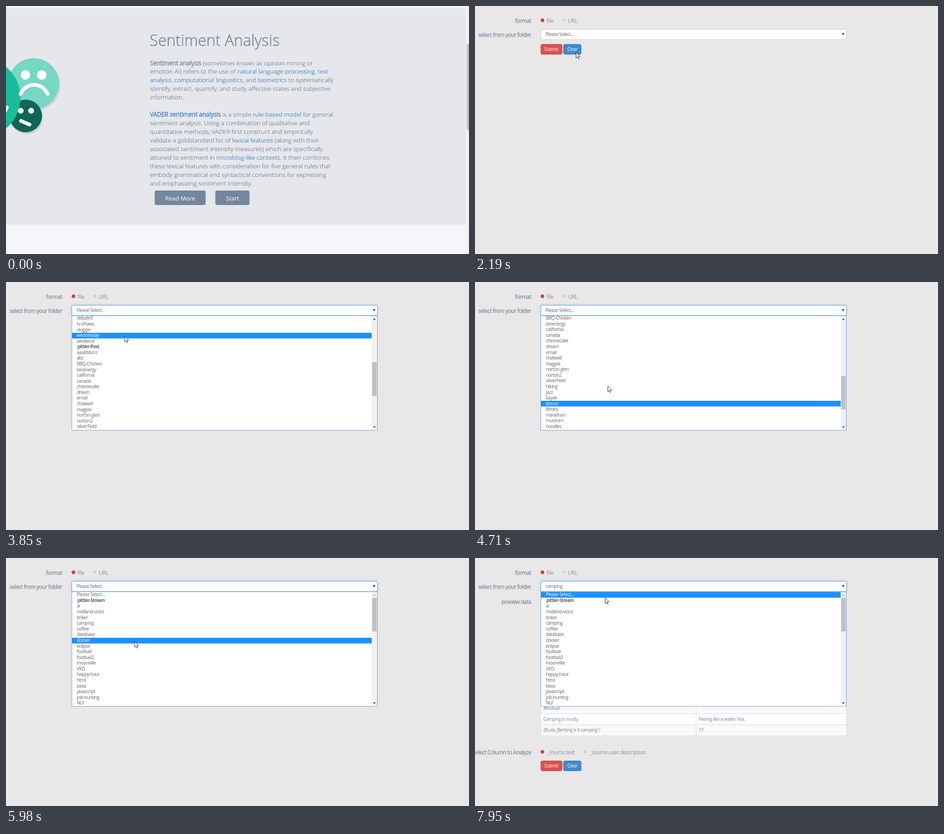
These frames come from a looping animation (1023x547 px, 8 s). An HTML page:

```html
<!DOCTYPE html>
<html lang="en">
<head>
<meta charset="utf-8">
<title>Sentiment Analysis</title>
<style>
html, body { margin: 0; width: 100%; height: 100%; overflow: hidden; background: #e9e7e7; }
svg { display: block; }
text { font-family: "Open Sans", "Noto Sans", sans-serif; white-space: pre; }
.title { font-size: 34.1px; font-weight: 300; fill: #74879f; stroke: #74879f; stroke-width: .5px; }
.body { font-size: 13.6px; font-weight: 300; fill: #6f8098; color: #6f8098; stroke: currentColor; stroke-width: .22px; }
.bold { font-weight: 400; letter-spacing: -.29px; stroke: currentColor; stroke-width: .3px; }
.link { fill: #3580c6; color: #3580c6; stroke: currentColor; }
.big { font-size: 13.1px; fill: #fff; text-anchor: middle; }
.label, .option { font-size: 12px; letter-spacing: -.48px; fill: #74879f; }
.label { text-anchor: end; stroke: #74879f; stroke-width: .25px; }
.option { fill: #8794a8; }
.small { font-size: 10px; letter-spacing: -.38px; fill: #616161; }
.small.group { font-weight: 600; letter-spacing: -.5px; fill: #3a3a3a; }
.small.white { fill: #fff; }
.cell { fill: #6f8097; }
.mid { text-anchor: middle; }
</style>
</head>
<body>
<svg width="1023" height="547" viewBox="0 0 1023 547">
  <defs>
    <clipPath id="listClip"><rect x="146" y="75" width="674" height="251.5"/></clipPath>
    <filter id="blur" x="-5%" y="-60%" width="110%" height="220%"><feGaussianBlur stdDeviation="2"/></filter>
    <g id="on"><circle r="5.2" fill="#f6f4f4"/><circle r="4.2" fill="#cb4640"/></g>
    <g id="off"><circle r="5.2" fill="#f6f4f4"/><circle r="4.2" fill="#d2d3d3"/></g>
  </defs>

  <g id="intro">
    <rect width="1023" height="547" fill="#f5f6f8"/>
    <rect y="4.5" width="1016" height="478" fill="#e6e7eb"/>
    <rect x="1016" width="7" height="547" fill="#f1f1f1"/>
    <rect x="1018" y="84" width="5" height="190" fill="#c1c1c1"/>
    <g fill="#cdcfd4"><circle cx="64" cy="174.5" r="56"/><circle cx="46" cy="246.5" r="36"/></g>
    <circle cx="61" cy="171" r="56" fill="#76d7c4"/>
    <circle cx="43.5" cy="242.5" r="36" fill="#0e6655"/>
    <circle cx="-56" cy="202" r="88" fill="#1abc9c"/>
    <g fill="#fff">
      <circle cx="43" cy="152" r="10.5"/><circle cx="79" cy="152" r="10.5"/>
      <circle cx="32.5" cy="231" r="6.5"/><circle cx="55.5" cy="231" r="6.5"/>
    </g>
    <g fill="none" stroke="#fff" stroke-width="8" stroke-linecap="round">
      <path d="M32 194Q42 174 62 174T92 194"/>
      <path d="M33 253.500L52 261.500M-6 238L2 224"/>
    </g>
    <text class="title" x="317.500" y="87.500">Sentiment Analysis</text>
    <g id="prose"></g>
    <rect x="328.500" y="407" width="112.500" height="32" rx="4" fill="#74879f"/>
    <rect id="start" x="462.500" y="407" width="75.500" height="32" rx="4"/>
    <text class="big" x="385" y="428.500">Read More</text>
    <text class="big" x="500.500" y="428.500">Start</text>
  </g>

  <g id="form">
    <text class="label" x="124" y="36.500">format</text>
    <use href="#on" x="149" y="31.500"/><text class="option" x="158" y="36.500">file</text>
    <use href="#off" x="196" y="31.500"/><text class="option" x="205" y="36.500">URL</text>
    <text class="label" x="124" y="67.500">select from your folder</text>
    <rect class="glow" x="144.500" y="50.500" width="677" height="24.500" rx="4" fill="#66afe9" filter="url(#blur)"/>
    <rect x="145.500" y="51.500" width="675" height="22.500" rx="3" fill="#fff" stroke="#ccc"/>
    <rect class="glow" x="145.500" y="51.500" width="675" height="22.500" rx="3" fill="none" stroke="#66afe9"/>
    <text id="value" class="small" x="155.800" y="66"></text>
    <path d="M811 59.800h5l-2.500 5.500z" fill="#333"/>
    <g id="address">
      <text class="label" x="124" y="101">URL</text>
      <rect x="145.500" y="84.500" width="675" height="23" rx="3" fill="#fff" stroke="#ccc"/>
      <text class="small" x="153.500" y="99.500">https://techservices.illinois.edu/news/2015/telling-compelling-stories-social-media-analytics-team</text>
    </g>
    <g id="preview">
      <text class="label" x="124" y="101">preview data</text>
      <g id="table"></g>
      <text class="label" x="124" y="433">Select Column to Analyze</text>
      <use href="#on" x="149" y="427.500"/><text class="option" x="158.500" y="433">_source.text</text>
      <use href="#off" x="243" y="427.500"/><text class="option" x="253" y="433">_source.user.description</text>
    </g>
    <g id="buttons">
      <rect x="145.500" y="84.500" width="47" height="22" rx="3" fill="#d9534f" stroke="#d43f3a"/>
      <rect x="195.500" y="84.500" width="39" height="22" rx="3" fill="#428bca" stroke="#357ebd"/>
      <text class="small white mid" x="168.500" y="99">Submit</text>
      <text class="small white mid" x="215" y="99">Clear</text>
    </g>
    <g id="menu">
      <rect x="145.500" y="74.500" width="675" height="252.500" fill="#fff" stroke="#6d9fd6"/>
      <g clip-path="url(#listClip)">
        <rect id="mark" x="146" width="662" height="12.500" fill="#1e90ff"/>
        <g id="list"></g>
      </g>
      <rect x="808" y="75" width="12" height="251.500" fill="#f1f1f1"/>
      <rect id="thumb" x="809" width="10" height="74" fill="#c1c1c1"/>
      <path id="upArrow" d="M811 83.500h6l-3-3.500z"/>
      <path d="M811 318.500h6l-3 3.500z" fill="#444"/>
    </g>
  </g>

  <path id="cursor" d="M.5.500V13L3.400 10.300L5.300 14.700L7.200 13.900L5.300 9.500H9Z" fill="#fff" stroke="#111" stroke-width=".9"/>
</svg>
<script>
const LOOP = 8000, ROW = 12.58, TOP = 75, TICK = 33.65;
const $ = id => document.getElementById(id);
const set = (el, attrs) => { for (const k in attrs) el.setAttribute(k, attrs[k]); };
const show = (id, on) => { $(id).style.display = on ? '' : 'none'; };
const add = (parent, tag, attrs, content = '') => {
  const el = document.createElementNS('http://www.w3.org/2000/svg', tag);
  set(el, attrs);
  el.innerHTML = content;
  parent.appendChild(el);
  return el;
};

// [link] and *bold* markup
const prose = `*Sentiment analysis* (sometimes known as opinion mining or
emotion AI) refers to the use of [natural language processing], [text]
[analysis], [computational linguistics], and [biometrics] to systematically
identify, extract, quantify, and study affective states and subjective
information.

[*VADER sentiment analysis*] is a simple [rule-based model] for general
sentiment analysis. Using a combination of qualitative and
quantitative methods, VADER first construct and empirically
validate a goldstandard list of [lexical features] (along with their
associated sentiment intensity measures) which are specifically
attuned to sentiment in [microblog-like contexts]. It then combines
these lexical features with consideration for five general rules that
embody grammatical and syntactical conventions for expressing
and emphasizing sentiment intensity.`;
prose.split('\n').forEach((line, i) => add($('prose'), 'text',
  { class: 'body', x: 318, y: 130.5 + i * 18.96 },
  line.replace(/\[(.*?)\]/g, '<tspan class="link">$1</tspan>')
      .replace(/\*(.*?)\*/g, '<tspan class="bold">$1</tspan>')));

const names = `Please Select...,pittler-Stream,ai,midland-voice,tinker,camping,coffee,database,docker,eclipse,
football,football2,moonville,VKD,happy-hour,html,bexa,javascript,job-hunting,NLF,program,Bill-dunby,wendlows,
tennis,debate5,tv-shows,vlogger,wednesday,weekend,pittler-Post,aaabbbccc,abc,BBQ-Chicken,bioenergy,california,
canada,cheesecake,dream,email,chatwell,magpie,norton-glen,norton2,oliverField,hiking,jazz,kayak,lemon,library,
marathon,museum,noodles,ocean,pancakes,python,recipes,robotics,sailing,sunrise,tulips,winter`.split(/,\s*/);
const isGroup = i => names[i].startsWith('pittler');
const items = names.map((name, i) => add($('list'), 'text',
  { x: isGroup(i) ? 157.8 : 156.4, y: 84.3 + i * ROW }, name));

const rows = [
  ['_source.text', '_source.user.description'],
  ['Packing the tent and the stove tonight, we leave for the lake early\ntomorrow morning and stay until Sunday.\n#camping', 'Weekend hiker, weekday gardener.'],
  ['Who else thinks that camping in the rain is still better than a day\nat the office? The fire is going and the coffee is hot.\n#outdoors', 'Coffee first.'],
  ['Our first family camping trip of the year was a great success, no\nbears and only one wet sleeping bag.\n#family', 'Mother of three, lover of maps.'],
  ['Looking for a good camping spot near the river, any ideas for a\nquiet place?', 'Always on the road.'],
  ['The camping tickets are sold out already, so we will be sleeping\nin the car again this summer.\n#festival', 'Music and mud.'],
  ['Camping is musty.', "Flexing like a walkin' lick."],
  ['@Lola_Benting is it camping ?', '17']
];
let rowTop = 84.5;
rows.forEach((cells, r) => {
  const lines = cells.map(c => c.split('\n'));
  const height = 11.7 + 12.6 * Math.max(...lines.map(l => l.length));
  lines.forEach((col, c) => {
    const x = c ? 488.5 : 145.5;
    add($('table'), 'rect', { x, y: rowTop, width: c ? 332 : 343, height, fill: r % 2 ? '#f9f9f9' : '#fff', stroke: '#ddd' });
    col.forEach((line, i) => add($('table'), 'text', { class: 'small cell', x: x + 5.5, y: rowTop + 15.2 + i * 12.6 }, line));
  });
  rowTop += height;
});

// [start, end, ...values reached]; each move advances in even steps
const moves = [
  [70, 470, 505, 425], [620, 700, 505, 492], [780, 860, 505, 480], [1010, 1250, 285, 227],
  [1790, 2350, 202, 60], [2980, 3140, 262, 119], [4250, 4400, 293, 229],
  [5670, 6160, 277, 150], [6610, 6930, 277, 65], [7870, 7950, 287, 87]
];
const scrolls = [[3220, 3850, 9], [3930, 4170, 13], [4640, 5590, 0]];

function track(segments, from, t) {
  for (const [start, end, ...to] of segments) {
    if (t < start) break;
    const n = Math.round((end - start) / 79) + 1;
    const step = Math.min(n, Math.floor((t - start) / (end - start) * (n - 1) + .1) + 1);
    from = from.map((v, i) => v + (to[i] - v) * step / n);
    if (step < n) break;
  }
  return from;
}

const rowAt = (y, scroll) => Math.floor((y - TOP + scroll) / ROW);

function drawMenu(t, y) {
  const scroll = track(scrolls, [0], t)[0] * TICK;
  let hot = t > 7000 ? 5 : 0;
  // scrolling back leaves the highlight one wheel tick behind
  if (t >= 4640 && t < 5670) hot = rowAt(y + 7, scroll + TICK);
  else if (y >= TOP) hot = rowAt(y, scroll);
  if (isGroup(hot)) hot++;
  set($('list'), { transform: `translate(0 ${-scroll})` });
  set($('mark'), { y: Math.round(TOP + hot * ROW - scroll) });
  set($('thumb'), { y: Math.round(88 + scroll / 3.4) });
  set($('upArrow'), { fill: scroll > 1 ? '#444' : '#a3a3a3' });
  items.forEach((el, i) => set(el, { class: 'small' + (isGroup(i) ? ' group' : i === hot ? ' white' : '') }));
}

function draw(now) {
  const t = now % LOOP;
  const [x, y] = track(moves, [952, 556], t);
  const intro = t < 1010, address = t < 1400, preview = t >= 7400;
  const open = t >= 2740 && t < 6380 || t >= 7790;
  show('intro', intro);
  show('form', !intro);
  show('address', address);
  show('preview', preview);
  show('menu', open);
  show('cursor', t >= 70);
  const hover = x > 463 && x < 538 && y > 407 && y < 439;
  set($('start'), { fill: hover ? '#5d7089' : '#74879f' });
  set($('cursor'), { transform: `translate(${x} ${y})` });
  set($('buttons'), { transform: `translate(0 ${preview ? 363 : address ? 33.5 : 0})` });
  $('value').textContent = t < 6380 ? 'Please Select...' : 'camping';
  const focus = Math.min(1, Math.max(0, (t - 2700) / 150));
  document.querySelectorAll('.glow').forEach(el => set(el, { opacity: focus * (el.hasAttribute('filter') ? .6 : 1) }));
  if (open) drawMenu(t, y);
}

const begin = performance.now();
(function frame() {
  draw(performance.now() - begin);
  requestAnimationFrame(frame);
})();
</script>
</body>
</html>
```
